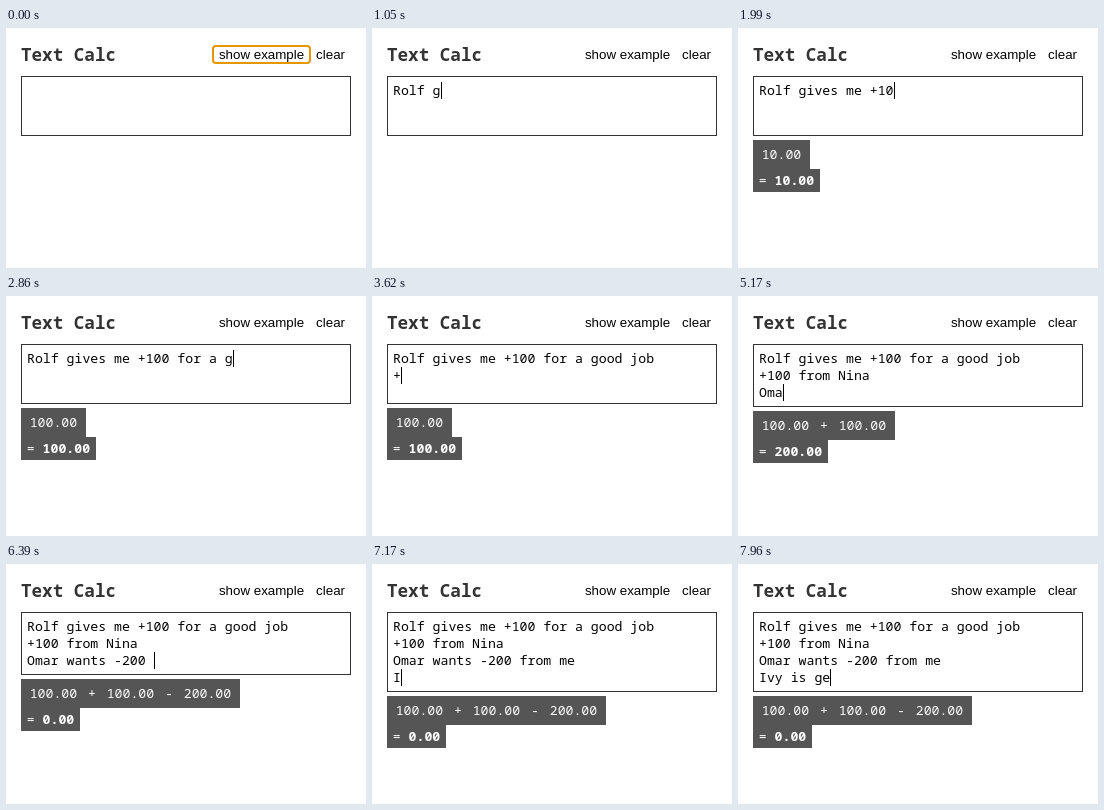
Recreate the animation shown at these times as an HTML page with a canvas. Size 360x240 px, loop 7990 ms.

```html
<!DOCTYPE html>
<html lang="en">
<head>
<meta charset="utf-8">
<title>Text Calc</title>
<style>
  html, body { margin: 0; width: 100%; height: 100%; overflow: hidden; background: #fff; }
  canvas { display: block; width: 360px; height: 240px; }
</style>
</head>
<body>
<canvas id="stage" width="360" height="240"></canvas>
<script>
const ctx = document.getElementById('stage').getContext('2d');

const LOOP = 7990;
const BLUR_AT = 40;        // the button loses focus
const TYPE_FROM = 423;
const KEY_MS = 91;
const SCRIPT = 'Rolf gives me +100 for a good job\n+100 from Nina\nOmar wants -200 from me\nIvy is getting';

const MONO = '"Noto Sans Mono", "DejaVu Sans Mono", monospace';
const BODY = '13.2px ' + MONO;
const BOLD = 'bold ' + BODY;
const TITLE = 'bold 17.6px ' + MONO;
const BUTTON = '13.333px "Liberation Sans", Arial, sans-serif';

const CHAR = 7.92;
const LINE = 17;
const PAD = 5.76;
const GAP = 2.88;
const LEFT = 15;

function text(str, x, y, font, color) {
  ctx.font = font;
  ctx.fillStyle = color;
  ctx.fillText(str, x, y);
}

function box(x, y, w, h, color) {
  ctx.fillStyle = color;
  ctx.fillRect(x, y, w, h);
}

function drawHeader(focused) {
  text('Text Calc', LEFT, 33, TITLE, '#333');
  text('show example', 212.9, 31, BUTTON, '#000');
  text('clear', 310.1, 31, BUTTON, '#000');
  if (!focused) return;
  ctx.strokeStyle = '#e59700';
  ctx.lineWidth = 2;
  ctx.beginPath();
  ctx.roundRect(207, 18, 97, 17, 3);
  ctx.stroke();
}

// Returns the bottom edge of the input, which grows with its lines.
function drawInput(typed, caret) {
  const lines = typed.split('\n');
  const height = Math.max(60, lines.length * LINE + 12);
  ctx.strokeStyle = '#333';
  ctx.lineWidth = 1;
  ctx.strokeRect(LEFT + 0.5, 48.5, 329, height - 1);
  lines.forEach((line, i) => text(line, 21, 67 + i * LINE, BODY, '#000'));
  if (caret) {
    const last = lines.length - 1;
    box(Math.round(21 + lines[last].length * CHAR), 54 + last * LINE, 1, LINE, '#000');
  }
  return 48 + height;
}

function drawResult(typed, top) {
  const terms = (typed.match(/[+-]\d+/g) || []).map(Number);
  if (!terms.length) return;
  const parts = terms.map(n => Math.abs(n).toFixed(2));
  const total = terms.reduce((a, b) => a + b, 0).toFixed(2);
  const chars = parts.join(' + ').length;
  const width = chars * CHAR + 2 * (PAD + GAP) + (parts.length - 1) * 2 * GAP;

  box(LEFT, top, Math.round(width), 29, '#555');
  let x = LEFT + PAD + GAP;
  parts.forEach((part, i) => {
    if (i) {
      x += GAP + CHAR;
      text(terms[i] < 0 ? '-' : '+', x, top + 19, BODY, '#fff');
      x += 2 * CHAR + GAP;
    }
    text(part, x, top + 19, BODY, '#fff');
    x += part.length * CHAR;
  });

  box(LEFT, top + 29, Math.round((total.length + 2) * CHAR + 2 * PAD), 23, '#555');
  text('=', LEFT + PAD, top + 45, BODY, '#fff');
  text(total, LEFT + PAD + 2 * CHAR, top + 45, BOLD, '#fff');
}

function draw(t) {
  const count = Math.max(0, Math.floor((t - TYPE_FROM) / KEY_MS));
  const typed = SCRIPT.slice(0, count);
  const focused = t < BLUR_AT;
  box(0, 0, 360, 240, '#fff');
  drawHeader(focused);
  const bottom = drawInput(typed, !focused);
  drawResult(typed, bottom + 4);
}

const start = performance.now();
function tick() {
  draw((performance.now() - start) % LOOP);
  requestAnimationFrame(tick);
}
tick();
</script>
</body>
</html>
```
